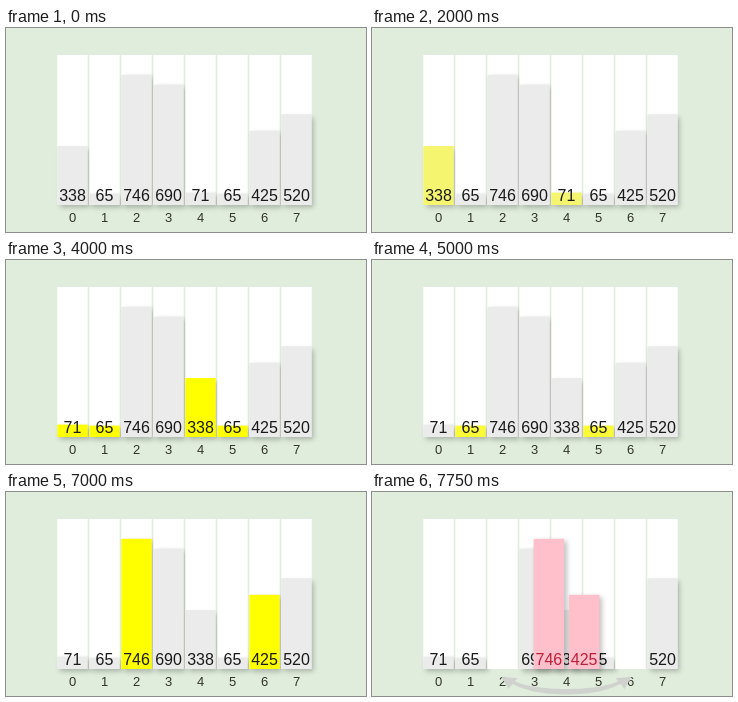
An HTML page with a canvas for the animation above (8 s loop, 360 px wide and 204 px high).

```html
<!DOCTYPE html>
<html lang="en">
<head>
<meta charset="utf-8">
<title>Shell sort</title>
<style>
html, body { margin: 0; width: 100%; height: 100%; overflow: hidden; background: #e0eddc; }
canvas { display: block; }
</style>
</head>
<body>
<canvas width="360" height="204"></canvas>
<script>
const ctx = document.querySelector('canvas').getContext('2d');
const LOOP = 8000, SWAP = 1000, BASE = 177, WIDTH = 30.4, GAP = 4;
const GREY = [235, 235, 235], YELLOW = [255, 255, 0];
const values = [338, 65, 746, 690, 71, 65, 425, 520];
const swaps = [{ left: 0, start: 2674 }, { left: 2, start: 7340 }];
// Yellow per pair: fade in from a to b, fade out from c to d
const glows = [
  [0, 1750, 2230, 2600, 2600], [0, 3850, 3850, 4400, 4850],
  [1, 3850, 3850, 4880, 5400], [2, 5950, 6450, 7260, 7260]
];

const slotX = i => 51.3 + 32 * i;
const centerX = i => slotX(i) + WIDTH / 2;
const ramp = (t, a, b) => a === b ? +(t >= a) : Math.min(1, Math.max(0, (t - a) / (b - a)));
const swing = p => 0.5 - Math.cos(p * Math.PI) / 2;
const mix = (a, b, p) => `rgb(${a.map((v, i) => Math.round(v + (b[i] - v) * p))})`;

function text(str, x, y, size, color) {
  ctx.font = `${size}px "Liberation Sans", Arial, sans-serif`;
  ctx.fillStyle = color;
  ctx.fillText(str, x, y);
}

function bar(value, x, fill, ink) {
  const h = value * 0.1745;
  ctx.save();
  ctx.shadowColor = 'rgba(0,0,0,.24)';
  ctx.shadowOffsetX = ctx.shadowOffsetY = 2.5;
  ctx.shadowBlur = 5;
  ctx.fillStyle = fill;
  ctx.fillRect(x, BASE - h, WIDTH, h);
  ctx.restore();
  text(value, x + WIDTH / 2, 173, 16, ink);
}

function arrow(cx) {
  ctx.fillStyle = '#d0d2ce';
  ctx.beginPath();
  ctx.moveTo(cx - 58, 189);
  ctx.bezierCurveTo(cx - 36, 207, cx + 36, 207, cx + 58, 189);
  ctx.lineTo(cx + 54, 188);
  ctx.bezierCurveTo(cx + 34, 200, cx - 34, 200, cx - 54, 188);
  ctx.fill();
  for (const side of [-1, 1]) {
    ctx.beginPath();
    ctx.moveTo(cx + side * 65, 185);
    ctx.lineTo(cx + side * 49, 186);
    ctx.lineTo(cx + side * 58, 197);
    ctx.fill();
  }
}

function draw(t) {
  const order = values.slice();
  if (t >= swaps[0].start + SWAP) [order[0], order[4]] = [order[4], order[0]];
  const active = swaps.find(s => t >= s.start - 80 && t < s.start + SWAP + 176);
  const moving = i => active && i % GAP === active.left;

  ctx.fillStyle = '#e0eddc';
  ctx.fillRect(0, 0, 360, 204);
  ctx.textAlign = 'center';
  order.forEach((value, i) => {
    ctx.fillStyle = '#fff';
    ctx.fillRect(slotX(i), 27, WIDTH, 150);
    if (moving(i)) return;
    const glow = glows.reduce((sum, [pair, a, b, c, d]) =>
      sum + (pair === i % GAP ? ramp(t, a, b) - ramp(t, c, d) : 0), 0);
    bar(value, slotX(i), mix(GREY, YELLOW, glow), '#1a1a1a');
  });
  order.forEach((_, i) => text(i, centerX(i), 194, 13, '#33332b'));

  if (active) {
    const { left, start } = active, right = left + GAP;
    const shift = 32 * GAP * swing(ramp(t, start, start + SWAP));
    arrow(centerX(left + GAP / 2));
    bar(values[left], slotX(left) + shift, 'pink', '#bc2038');
    bar(values[right], slotX(right) - shift, 'pink', '#bc2038');
  }
}

const begin = performance.now();
function tick() {
  draw((performance.now() - begin) % LOOP);
  requestAnimationFrame(tick);
}
tick();
</script>
</body>
</html>
```
